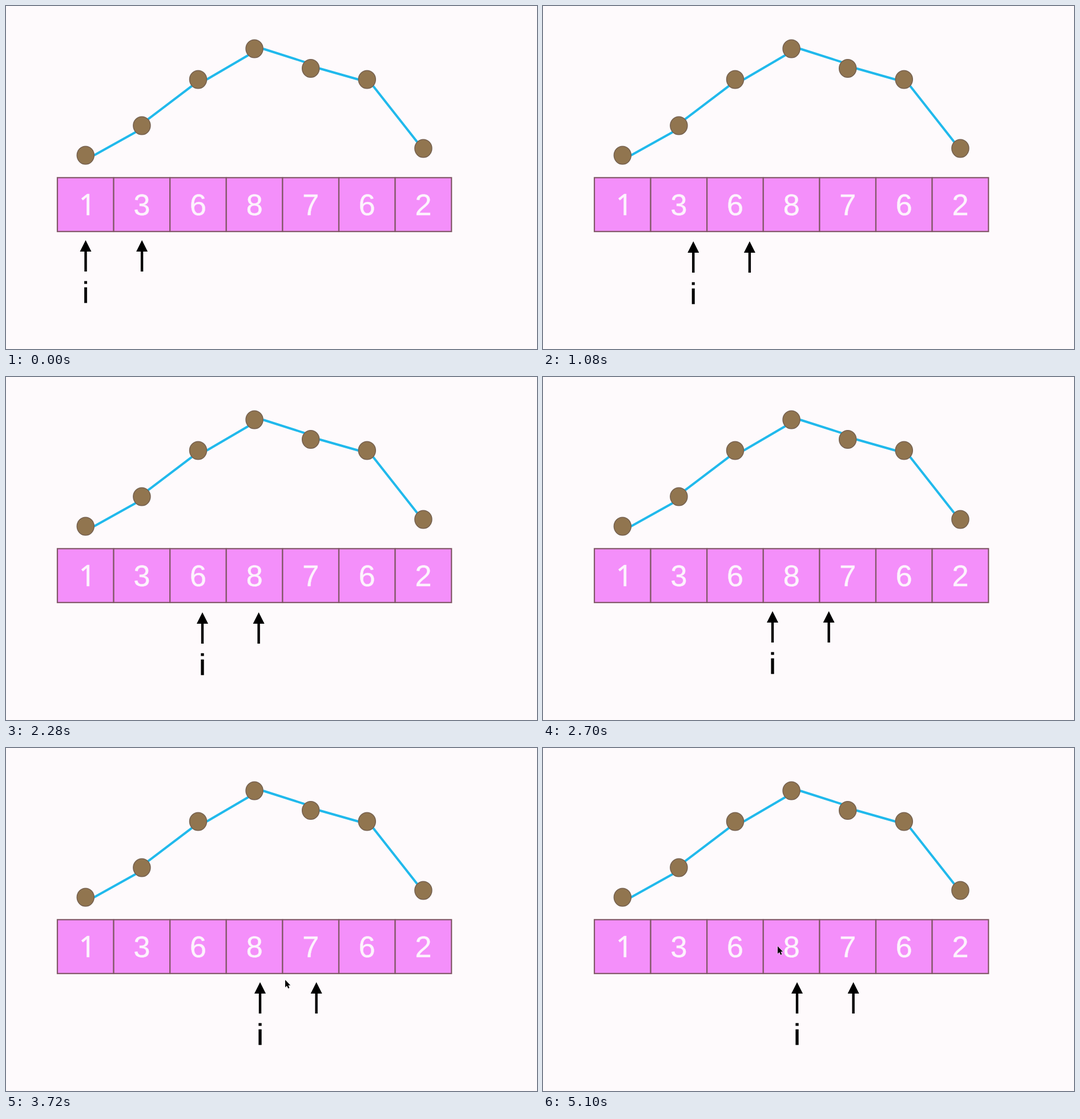
An HTML page that plays this animation: 930 px wide and 602 px high, repeating every 5160 ms.

```html
<!DOCTYPE html>
<html lang="en">
<head>
<meta charset="utf-8">
<title>Peak search</title>
<style>
  html, body { margin: 0; width: 100%; height: 100%; overflow: hidden; background: #fefafc; }
  svg { display: block; width: 930px; height: 602px; }
  text { font: 52px "Liberation Sans", Arial, sans-serif; text-anchor: middle; stroke-width: .5; }
  .cell { fill: #f48ffa; stroke: #825868; stroke-width: 2.2; }
  .digit { fill: #fdf3fd; stroke: #fdf3fd; }
  .one { font: 51px "Noto Sans", sans-serif; transform: translateX(3px); }
  .link { stroke: #20b9ec; stroke-width: 4; }
  .dot { fill: #91754f; stroke: #75604f; stroke-width: 1.5; }
  .label { stroke: #000; }
</style>
</head>
<body>
<svg viewBox="0 0 930 602">
  <defs>
    <path id="arrow" d="M0 411L10 431H2.2V466H-2.2V431H-10Z"/>
  </defs>
  <g id="chart"></g>
  <g id="pointer">
    <use href="#arrow"/>
    <use href="#arrow" x="98.6"/>
    <text class="label" y="521">i</text>
  </g>
  <path id="cursor" d="M0 0V13L3 10.3L5.2 15L7.4 14L5.3 9.4H9.2Z" stroke="#fff" paint-order="stroke"/>
</svg>
<script>
  const LOOP = 5160, STEP = 60, CELL = 98.6, LEFT = 90, RX = 15, RY = 15.8;
  const values = [1, 3, 6, 8, 7, 6, 2];
  const heights = [262, 210, 129, 75, 109.5, 129, 250];

  // Key points: [time, x, y]
  const drag = [
    [0, 139.5, 0], [600, 209, 0], [1440, 304, 0], [1860, 344, 0],
    [2280, 344, 0], [2700, 402, 0], [3060, 445, 0]
  ];
  const mouse = [[3420, 458, 532], [3720, 489, 407], [4320, 411, 348]];

  const chart = document.getElementById("chart");
  const pointer = document.getElementById("pointer");
  const cursor = document.getElementById("cursor");

  function add(name, attrs, text = "") {
    const node = document.createElementNS("http://www.w3.org/2000/svg", name);
    for (const key in attrs) node.setAttribute(key, attrs[key]);
    node.textContent = text;
    chart.append(node);
  }

  const middle = i => LEFT + CELL * (i + 0.5);

  // A link meets a dot at its side, or at its diagonal when the slope is steep.
  function site(i, side, rise, steep) {
    const k = Math.SQRT1_2;
    return steep
      ? [middle(i) + side * RX * k, heights[i] + side * Math.sign(rise) * RY * k]
      : [middle(i) + side * RX, heights[i]];
  }

  function addLink(i) {
    const rise = heights[i + 1] - heights[i], size = Math.abs(rise);
    const [x1, y1] = site(i, 1, rise, size > 70);
    const [x2, y2] = site(i + 1, -1, rise, size > 30);
    add("line", { class: "link", x1, y1, x2, y2 });
  }

  values.forEach((value, i) => {
    if (i < values.length - 1) addLink(i);
    add("rect", { class: "cell", x: LEFT + CELL * i, y: 301.3, width: CELL, height: 94.5 });
    add("text", { class: value === 1 ? "digit one" : "digit", x: middle(i), y: 367 }, value);
  });
  heights.forEach((cy, i) => add("ellipse", { class: "dot", cx: middle(i), cy, rx: RX, ry: RY }));

  const linear = k => k;
  const easeOut = k => 1 - (1 - k) ** 5;

  function along(keys, t, ease) {
    const next = keys.findIndex(key => key[0] > t);
    if (next < 1) return keys.at(next).slice(1);
    const [t0, x0, y0] = keys[next - 1], [t1, x1, y1] = keys[next];
    const k = ease((t - t0) / (t1 - t0));
    return [x0 + (x1 - x0) * k, y0 + (y1 - y0) * k];
  }

  // The dragged pointer sags by two pixels midway.
  const sag = t => Math.min(2, Math.max(0, 6 * Math.sin(Math.PI * (t - 600) / 2100))) * (t > 600 && t < 2700);

  const place = (node, x, y) => node.setAttribute("transform", `translate(${x} ${y})`);

  function draw(now) {
    const t = Math.floor((now % LOOP) / STEP) * STEP;
    const [x, y] = along(drag, t, linear);
    place(pointer, x, y + sag(t));
    place(cursor, ...along(mouse, t, easeOut));
    cursor.setAttribute("visibility", t < mouse[0][0] ? "hidden" : "visible");
  }

  const start = performance.now();
  function tick() {
    draw(performance.now() - start);
    requestAnimationFrame(tick);
  }
  tick();
</script>
</body>
</html>
```
